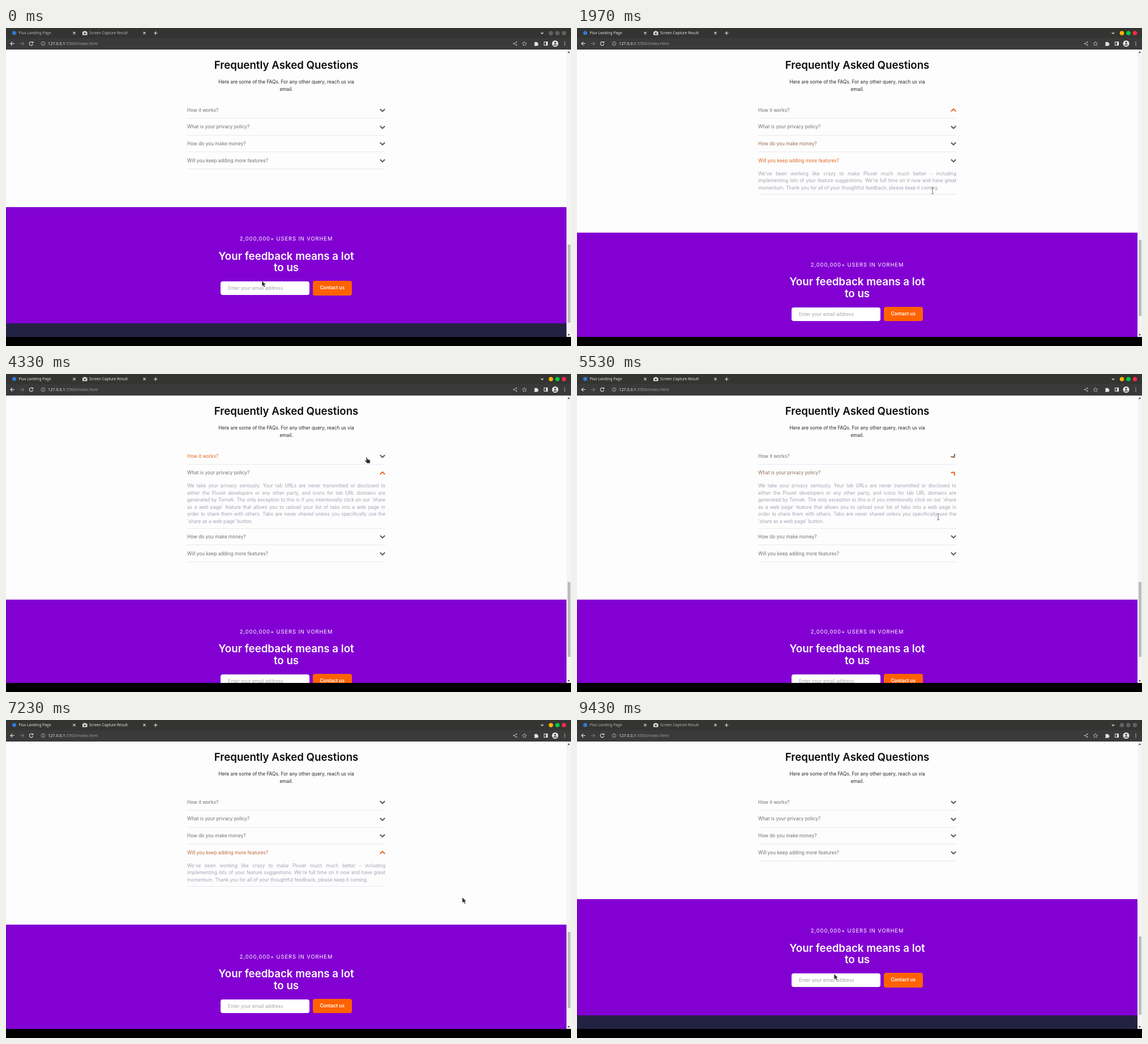
Animation of 998 by 561 pixels, one loop 9810 ms. Source, as an HTML page:

```html
<!DOCTYPE html>
<html lang="en">
<head>
<meta charset="utf-8">
<title>Landing Page</title>
<style>
html, body { margin: 0; width: 100%; height: 100%; overflow: hidden; background: #000; }
#stage { position: relative; width: 998px; height: 561px; overflow: hidden; background: #000; }
#stage div, #stage svg, #stage span { position: absolute; white-space: nowrap; }
#page { left: 0; top: 38px; width: 990px; height: 507px; overflow: hidden; background: #fdfdfd;
  font: 8.32px/12.45px Inter, sans-serif; }
#page .mid { left: 0; width: 990px; text-align: center; }
#page .big { font-size: 18.7px; line-height: 20.8px; font-weight: 600; }
#faq { left: 320px; top: 92.4px; width: 350px; }
.row { left: 0; width: 350px; border-bottom: 1px solid #e9e6f6; box-sizing: border-box; }
.ask { left: 0; top: 8.4px; }
.row svg { left: 338px; top: 7.6px; overflow: visible; }
.answer { left: 0; top: 31.4px; width: 350px; color: #a6a2b3; }
#stage .answer p { margin: 0; text-align-last: justify; }
#stage .answer p:last-child { text-align-last: left; }
#cta { left: 0; width: 990px; height: 205px; background: #8300d3; color: #fff; }
#foot { left: 0; top: 205px; width: 990px; height: 200px; background: #242244; }
#count { top: 50.5px; font-size: 9.36px; letter-spacing: .1em; }
#field { left: 379px; top: 131.5px; width: 157px; height: 24px; border-radius: 4px; background: #fff;
  color: #a2a2aa; line-height: 25px; text-indent: 13px; }
#send { left: 541.5px; top: 130.5px; width: 69.5px; height: 25.5px; border-radius: 4px; background: #ff6200;
  line-height: 25px; text-align: center; font-weight: 600; }
#bar { left: 990px; top: 38px; width: 8px; height: 507px; background: #f4f4f4; }
#thumb { left: 1.5px; width: 5.5px; background: #bdbdbd; }
#topbar { left: 0; top: 0; }
#topbar text { font-family: "Noto Sans", sans-serif; }
#cursor { left: 0; top: 0; overflow: visible; }
</style>
</head>
<body>
<div id="stage">
  <div id="page">
    <div class="mid big" style="top:17.6px;color:#0c0c0c">Frequently Asked Questions</div>
    <div class="mid" style="top:51.4px;color:#262626">Here are some of the FAQs. For any other query, reach us via<br>email.</div>
    <div id="faq"></div>
    <div id="cta">
      <div class="mid" id="count">2,000,000+ USERS IN VORHEM</div>
      <div class="mid big" style="top:77px">Your feedback means a lot<br>to us</div>
      <div id="field">Enter your email address</div>
      <div id="send">Contact us</div>
      <div id="foot"></div>
    </div>
  </div>
  <div id="bar">
    <svg width="8" height="507" fill="#444"><path d="M2 6l2-3 2 3zM2 502l2 3 2-3z"/></svg>
    <div id="thumb"></div>
  </div>
  <svg id="topbar" width="998" height="38" fill="none" stroke="#e6e6e6" stroke-width="1.1">
    <path d="M0 0H998V38H0z" fill="#393a39" stroke="none"/>
    <path d="M0 0H998V18H0z" fill="#343532" stroke="none"/>
    <g stroke="none" font-size="6.6" fill="#e0e0e0">
      <circle cx="14.5" cy="8.8" r="3.5" fill="#3379d8"/>
      <g id="titles"><text x="22.5" y="11.4">Pluv Landing Page</text><text x="147" y="11.4">Screen Capture Result</text></g>
      <path d="M135 6.5h2l1-1.3h2.5l1 1.3h2v6h-8.5z" fill="#dcdcdc"/>
      <circle cx="139.2" cy="9.4" r="1.7" fill="#444"/>
      <text x="74" y="30" font-size="7.28" fill="#9d9d9d"><tspan fill="#e6e6e6">127.0.0.1</tspan>:5500/index.html</text>
    </g>
    <path d="M118.5 7l4 4m0-4l-4 4M242.5 7l4 4m0-4l-4 4M261 9h6.5m-3.25-3.25v6.5M944.8 8l2.2 2.2 2.2-2.2"/>
    <path d="M15 27.5H8m3.2-3.2L8 27.5l3.2 3.2"/>
    <path d="M24.5 27.5h7m-3.2-3.2l3.2 3.2-3.2 3.2" stroke="#777"/>
    <path d="M47 25.5a3.2 3.2 0 1 0 .5 3M47.7 23.7v2.3h-2.3"/>
    <g stroke="#bdbdbd" stroke-width=".8">
      <circle cx="65.5" cy="27.5" r="3.3"/><path d="M65.5 27v2.3m0-3.9v.8"/>
      <path d="M901.5 25l-4.5 2.5 4.5 2.5"/>
      <g fill="#bdbdbd"><circle cx="901.5" cy="25" r=".8"/><circle cx="897" cy="27.5" r=".8"/><circle cx="901.5" cy="30" r=".8"/></g>
      <path d="M915.7 23.8l1.1 2.5 2.7.3-2 1.8.6 2.7-2.4-1.4-2.4 1.4.6-2.7-2-1.8 2.7-.3z"/>
    </g>
    <g fill="#e6e6e6" stroke="none">
      <path d="M933 25.5h2a1.2 1.2 0 0 1 2.4 0h2v2a1.2 1.2 0 0 1 0 2.4v1.6h-6.4v-1.7a1.2 1.2 0 0 0 0-2.4z"/>
      <path d="M950 24h7v7h-7zm1 1v5h2.8v-5z" fill-rule="evenodd"/>
      <circle cx="970" cy="27.5" r="5.5"/>
      <g fill="#393a39"><circle cx="970" cy="26" r="1.7"/><path d="M966.7 30.8a3.4 2.6 0 0 1 6.6 0z"/></g>
      <circle cx="987" cy="24.8" r=".8"/><circle cx="987" cy="27.5" r=".8"/><circle cx="987" cy="30.2" r=".8"/>
    </g>
    <g id="lights" stroke="none"><circle cx="962.5" cy="9" r="3.8"/><circle cx="974" cy="9" r="3.8"/><circle cx="985.5" cy="9" r="3.8"/></g>
  </svg>
  <svg id="cursor" width="12" height="14" stroke-linejoin="round">
    <path id="arrow" d="M0 0v9.5l2.3-1.8 1.7 3.5 1.7-.8-1.6-3.4 3-.3z" fill="#2e2e30" stroke="#ddd" stroke-width=".5"/>
    <path id="hand" d="M-1 0q1-.8 1.7.3l1 3.2 3.5.9q1.4.6 1.1 2.3l-.6 3.8H1L-3 6.2q-.3-1.2 1.2-.9l1.3.8z" fill="#2e2e30" stroke="#ddd" stroke-width=".5"/>
    <path id="beam" d="M-2-5.5q2 0 2 1.2 0-1.2 2-1.2M0-4.3v8.6M-2 5.5q2 0 2-1.2 0 1.2 2 1.2" fill="none" stroke="#555" stroke-width=".9"/>
  </svg>
</div>
<script>
const LOOP = 9810, LINE = 12.45, ROW = 29.64, FAQ_TOP = 130.4;
const GREY = [112, 112, 112], ORANGE = [232, 101, 26], CHEVRON = [88, 88, 84];
const LIGHTS = [[250, 180, 0], [0, 205, 65], [255, 38, 75]], DIM = [98, 98, 98];

const items = [
  ["How it works?",
   "Whenever you find yourself with too many tabs, click the Pluvet icon to|convert all of your tabs into a list. When you need to access the tabs|again, you can either restore them individually or all at once."],
  ["What is your privacy policy?",
   "We take your privacy seriously. Your tab URLs are never transmitted or disclosed to|either the Pluvet developers or any other party, and icons for tab URL domains are|generated by Tornek. The only exception to this is if you intentionally click on our 'share|as a web page' feature that allows you to upload your list of tabs into a web page in|order to share them with others. Tabs are never shared unless you specifically use the|'share as a web page' button."],
  ["How do you make money?",
   "Pluvet is free of charge and is not designed to make money. It was created because we|badly *needed* it for our own use, and we wanted to share it with the world."],
  ["Will you keep adding more features?",
   "We've been working like crazy to make Pluvet much much better - including|implementing lots of your feature suggestions. We're full time on it now and have great|momentum. Thank you for all of your thoughtful feedback, please keep it coming."]
].map(([ask, answer]) => ({ ask, lines: answer.split("|") }));

// Click time and the item open afterwards
const clicks = [[-1000, -1], [900, 0], [1960, 3], [2720, 2], [3150, 1], [4430, 0], [5320, 1], [5950, 2], [6600, 3], [8300, -1]];
// Time, x, y
const path = [
  [0, 452, 446], [100, 452, 446], [850, 634, 147], [1150, 634, 148], [1970, 628, 287], [2200, 629, 291],
  [2680, 632, 207], [2870, 632, 176], [3200, 634, 174], [3700, 635, 175], [4200, 637, 147], [4900, 637, 148],
  [5300, 638, 226], [5530, 638, 252], [5850, 640, 286], [6050, 640, 286], [6500, 641, 266], [6700, 642, 265],
  [6900, 650, 238], [7040, 660, 236], [7230, 806, 313], [7730, 650, 236], [8450, 650, 236],
  [9200, 451, 448], [9330, 451, 448], [9430, 454, 448], [LOOP, 454, 448]
];

const $ = id => document.getElementById(id);
const clamp = v => Math.max(0, Math.min(1, v));
const smooth = v => (v = clamp(v), v * v * (3 - 2 * v));
const mix = (a, b, p) => `rgb(${a.map((v, i) => Math.round(v + (b[i] - v) * p))})`;
const extra = i => i < 0 ? 0 : 8.2 + items[i].lines.length * LINE;
const lastClick = t => clicks.findLastIndex(c => c[0] <= t);
const openAt = t => clicks[Math.max(0, lastClick(t))][1];

for (const item of items) {
  const row = document.createElement("div");
  row.className = "row";
  row.innerHTML = `<span class="ask">${item.ask}</span>
    <svg width="14" height="14"><path d="M2.8 5L7 9.2 11.2 5" fill="none" stroke-width="2"/></svg>
    <div class="answer">${item.lines.map(l => `<p>${l}</p>`).join("")}</div>`;
  $("faq").append(row);
  Object.assign(item, { row, label: row.children[0], chevron: row.querySelector("path"), body: row.children[2] });
}

function pointer(t) {
  const k = Math.max(1, path.findIndex(p => p[0] > t));
  const [t0, x0, y0] = path[k - 1], [t1, x1, y1] = path[k];
  const p = smooth((t - t0) / (t1 - t0));
  return [x0 + (x1 - x0) * p, y0 + (y1 - y0) * p];
}

function hit(t) {
  const [x, y] = pointer(Math.max(0, t)), open = openAt(t);
  if (x < 320 || x > 670) return { kind: "arrow", row: -1 };
  let top = FAQ_TOP;
  for (let i = 0; i < items.length; i++) {
    if (y >= top && y < top + ROW) return { kind: "hand", row: i };
    top += ROW;
    if (i === open) {
      if (y >= top && y < top + extra(i)) return { kind: "beam", row: -1 };
      top += extra(i);
    }
  }
  return { kind: "arrow", row: -1 };
}

// Hover colour fades as a running mean over the last 300 ms
function hoverLevels(t) {
  const levels = [0, 0, 0, 0], steps = 20;
  for (let k = 0; k < steps; k++) {
    const { row } = hit(t - k * 300 / steps);
    if (row >= 0) levels[row] += 1 / steps;
  }
  return levels;
}

function draw(t) {
  const n = lastClick(t), open = clicks[n][1], before = n ? clicks[n - 1][1] : -1;
  const turn = smooth((t - clicks[n][0]) / 300), hover = hoverLevels(t);
  let top = 0;
  items.forEach((item, i) => {
    const level = i === open ? turn : i === before ? 1 - turn : 0;
    const height = ROW + (i === open ? extra(i) : 0);
    item.row.style.top = top + "px";
    item.row.style.height = height + "px";
    item.body.style.display = i === open ? "block" : "none";
    item.label.style.color = mix(GREY, ORANGE, smooth(hover[i] * 1.3));
    item.chevron.setAttribute("transform", `rotate(${-180 * level} 7 7)`);
    item.chevron.setAttribute("stroke", mix(CHEVRON, ORANGE, clamp(level * 1.5)));
    top += height;
  });
  const shift = extra(open), total = 1825 + shift;
  $("cta").style.top = 277.5 + shift + "px";
  $("thumb").style.top = 7 + 497 * 1237 / total + "px";
  $("thumb").style.height = 497 * 507 / total + "px";

  const focus = clamp((t - 900) / 200) - clamp((t - 9000) / 200);
  [...$("lights").children].forEach((c, i) => c.setAttribute("fill", mix(DIM, LIGHTS[i], focus)));
  $("titles").setAttribute("opacity", .75 + .25 * focus);

  const [x, y] = pointer(t), { kind } = hit(t);
  $("cursor").style.transform = `translate(${x}px, ${y}px)`;
  for (const id of ["arrow", "hand", "beam"]) $(id).style.display = id === kind ? "" : "none";
}

const start = performance.now();
function tick() {
  draw((performance.now() - start) % LOOP);
  requestAnimationFrame(tick);
}
tick();
</script>
</body>
</html>
```
